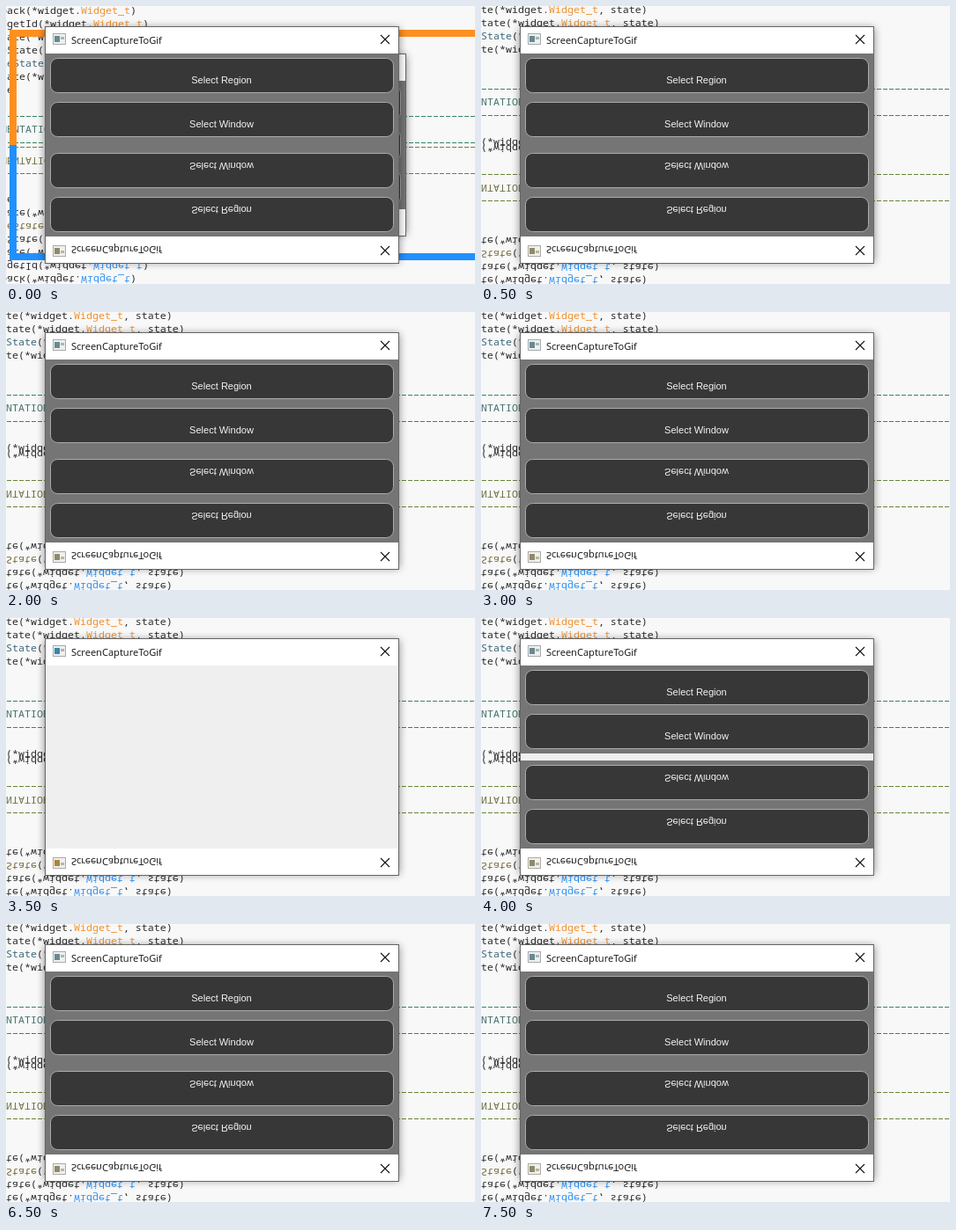
These frames come from a looping animation (532x316 px, 8000 ms). An HTML page:

```html
<!DOCTYPE html>
<html lang="en">
<head>
<meta charset="utf-8">
<title>Mirrored screen capture</title>
<style>
html, body { margin: 0; width: 100%; height: 100%; overflow: hidden; background: #f8f8f8; }
svg { display: block; }
text { white-space: pre; }
.code { font: 11.667px "Noto Sans Mono", monospace; fill: #2b2b2b; }
.title { font: 11.1px "Open Sans", "Noto Sans", sans-serif; fill: #111; }
.label { font: 11px "Liberation Sans", Arial, sans-serif; fill: #f4f4f4; text-anchor: middle; }
.type { fill: #f0902f; }
.name { fill: #3d6878; }
.note { fill: #47736f; }
.rule { stroke: #368468; stroke-dasharray: 5 2; }
.button { fill: #373737; stroke: #acacac; }
.shadow { filter: drop-shadow(0 2px 5px #0007); }
</style>
</head>
<body>
<svg width="532" height="316" viewBox="0 0 532 316">
  <defs>
    <clipPath id="upper"><rect width="532" height="158"/></clipPath>
    <filter id="swap" filterUnits="userSpaceOnUse" x="0" y="0" width="532" height="158"
            color-interpolation-filters="sRGB">
      <feColorMatrix values="0 0 1 0 0  0 1 0 0 0  1 0 0 0 0  0 0 0 1 0"/>
    </filter>
  </defs>
  <g id="half" clip-path="url(#upper)">
    <rect width="532" height="158" fill="#f8f8f8"/>
    <g id="editor" class="code"></g>
    <g id="moving">
      <use href="#window" x="8" y="31"/>
      <path d="M532 31H8V170" fill="none" stroke="#ff9020" stroke-width="8"/>
    </g>
    <g id="window">
      <rect class="shadow" x="44" y="23" width="402" height="200" fill="#666"/>
      <rect x="45" y="24" width="400" height="30" fill="#fff"/>
      <rect x="45" y="54" width="400" height="200" fill="#efefef"/>
      <g id="icon">
        <rect x="53.5" y="31.5" width="14" height="12" fill="#eef0f0" stroke="#a5aaab"/>
        <rect x="55" y="34" width="6" height="7" fill="#688a91"/>
        <rect x="62" y="35" width="4" height="3" fill="#a9b6b8"/>
      </g>
      <text class="title" x="74" y="43">ScreenCaptureToGif</text>
      <path d="M425 33l10 10m0-10l-10 10" stroke="#111" stroke-width="1.1"/>
      <g id="panel">
        <rect x="45" y="54" width="400" height="200" fill="#757575"/>
        <rect class="button" x="50.5" y="59.5" width="389" height="39" rx="8"/>
        <rect class="button" x="50.5" y="109.5" width="389" height="39" rx="8"/>
        <text class="label" x="244.5" y="88">Select Region</text>
        <text class="label" x="244.5" y="138">Select Window</text>
      </g>
      <rect id="strip" x="45" y="154" width="400" height="8" fill="#efefef"/>
    </g>
  </g>
  <g transform="matrix(1 0 0 -1 0 316)"><use href="#half" filter="url(#swap)"/></g>
</svg>
<script>
const $ = id => document.getElementById(id);
const args = '(*widget.<tspan class="type">Widget_t</tspan>';
const tag = (cls, s) => `<tspan class="${cls}">${s}</tspan>`;

// Each entry: row number, then the code on it; an empty string is a dashed rule.
const rows = [
  [-2, `back${args})`],
  [-1, `dgetId${args})`],
  [0, `tate${args}, state)`],
  [1, `eState${args}, state)`],
  [2, tag("name", "leState") + args + ")"],
  [3, `tate${args}, state)`],
  [4, "te"],
  [6, ""],
  [7, tag("note", "MENTATION")],
  [8, ""],
  [10, `  ${args})`]
];
$("editor").innerHTML = rows.map(([n, code]) => {
  const y = 8 + n * 15;
  return code
    ? `<text x="-14" y="${y}">${code}</text>`
    : `<path class="rule" d="M-13 ${y - 3.5}H540"/>`;
}).join("");

const show = (id, on) => $(id).style.display = on ? "" : "none";

function draw(now) {
  const t = now % 8000;
  const between = (a, b) => t >= a && t < b;
  const moving = t < 500;
  $("editor").setAttribute("transform", moving ? "translate(8 31)" : "");
  show("moving", moving);
  show("panel", !between(3500, 4000));
  show("strip", between(4000, 4500));
  $("icon").children[1].setAttribute("fill", between(3500, 4000) ? "#3a86ab" : "#688a91");
  requestAnimationFrame(draw);
}
draw(performance.now());
</script>
</body>
</html>
```
